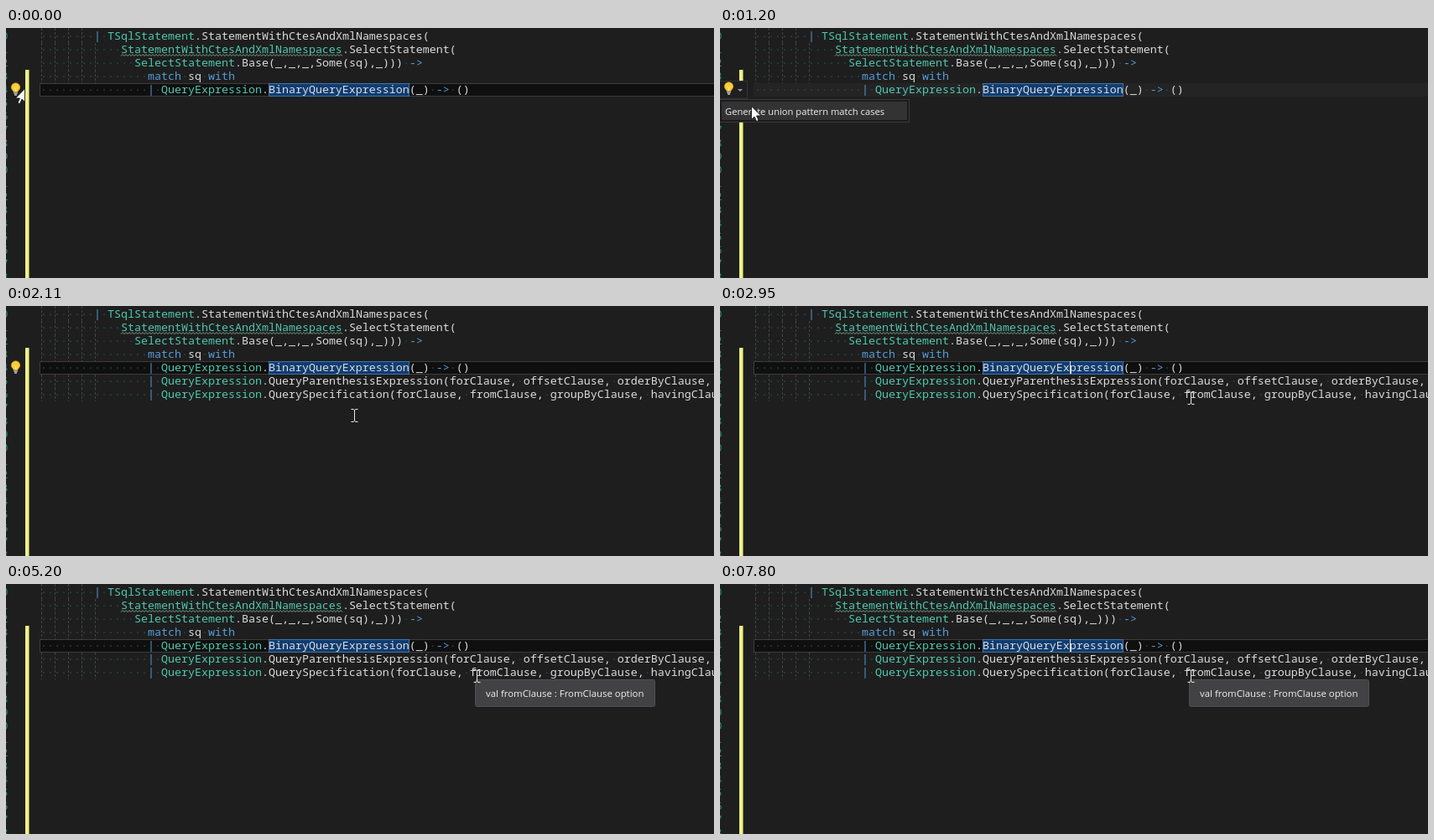
Recreate the animation shown at these times as an HTML page. Size 844 px wide and 299 px high, loop 8000 ms.

```html
<!DOCTYPE html>
<html lang="en">
<head>
<meta charset="utf-8">
<title>Union case generation</title>
<style>
html, body { margin: 0; width: 100%; height: 100%; overflow: hidden; background: #1e1e1e; }
svg { display: block; width: 844px; height: 299px; }
text { white-space: pre; fill: #dcdcdc; }
.code { font: 13.3333px "Noto Sans Mono", monospace; }
.ui { font-family: "Open Sans", sans-serif; fill: #f1f1f1; }
.type { fill: #4ec9b0; }
.keyword { fill: #569cd6; }
.space { fill: #2c4a50; }
.number { fill: #2b917f; }
.guide { stroke: #434343; stroke-dasharray: 3 2; }

#line, #cases, #button, #menu, #bulb, #caret, #tip, #margin, #arrow, #beam {
  animation: 8s step-end infinite;
}
#line { animation-name: line; }
#cases { animation-name: cases; }
#button { animation-name: button; }
#menu { animation-name: menu; }
#bulb { animation-name: bulb; }
#caret { animation-name: caret; }
#tip { animation-name: tip; }
#margin { animation-name: margin; }
#arrow { animation-name: arrow; }
#beam { animation-name: beam; }

@keyframes line {
  0%, 20% { fill: #0f0f0f; stroke: #3c3c3c; }
  6.75% { fill: #242424; stroke: #242424; }
}
@keyframes cases { 0% { opacity: 0; } 20% { opacity: 1; } }
@keyframes button { 0%, 20% { opacity: 0; } 3.375% { opacity: 1; } }
@keyframes menu { 0%, 20% { opacity: 0; } 6.75% { opacity: 1; } }
@keyframes bulb {
  0%, 24.875% { opacity: 1; transform: none; }
  3.375% { opacity: 1; transform: translate(-1px, -1px); }
  20%, 33.5% { opacity: 0; transform: none; }
}
@keyframes caret {
  0%, 26.375%, 38.75%, 51.375%, 65%, 77.75%, 90.875% { opacity: 0; }
  20%, 31.625%, 46%, 58.375%, 72%, 84.375%, 97.5% { opacity: 1; }
}
@keyframes tip { 0% { opacity: 0; } 40.625% { opacity: 1; } }
@keyframes margin {
  0% { opacity: 1; transform: translate(23px, 72px); }
  1.5%, 21.875% { opacity: 0; }
  20% { opacity: 1; transform: translate(37px, 93px); }
}
@keyframes arrow {
  0%, 20% { opacity: 0; }
  1.5% { opacity: 1; transform: translate(19px, 72px); }
  3.375% { opacity: 1; transform: translate(13px, 74px); }
  9.75% { opacity: 1; transform: translate(21px, 76px); }
  11.625% { opacity: 1; transform: translate(28px, 83px); }
  13.125% { opacity: 1; transform: translate(35px, 89px); }
  15% { opacity: 1; transform: translate(37px, 93px); }
}
@keyframes beam {
  0% { opacity: 0; }
  21.875% { opacity: 1; transform: translate(72px, 104px); }
  23.375% { opacity: 1; transform: translate(180px, 117px); }
  24.875% { opacity: 1; transform: translate(325px, 128px); }
  26.375% { opacity: 1; transform: translate(415px, 131px); }
  27.875% { opacity: 1; transform: translate(444px, 118px); }
  29.75% { opacity: 1; transform: translate(493px, 116px); }
  31.625% { opacity: 1; transform: translate(535px, 113px); }
  33.5% { opacity: 1; transform: translate(550px, 111px); }
  35% { opacity: 1; transform: translate(557px, 110px); }
  36.875% { opacity: 1; transform: translate(561px, 110px); }
}
</style>
</head>
<body>
<svg viewBox="0 0 844 299">
  <defs>
    <path id="pointer" d="M.5.5V16.5L4 13L6.6 18.6L9 17.5L6.5 12H11.5Z" fill="#fff" stroke="#111" stroke-width=".8"/>
  </defs>
  <rect width="844" height="299" fill="#1e1e1e"/>
  <g id="numbers"></g>
  <rect x="23" y="50" width="4.5" height="249" fill="#eff284"/>
  <rect id="line" x="40.5" y="66.5" width="808" height="15"/>
  <rect x="313.5" y="66.5" width="167" height="15" fill="#103c70" stroke="#3f74a8"/>
  <g id="base"></g>
  <g id="cases"></g>
  <path id="squiggle" fill="none" stroke="#85b39a" stroke-width=".9"/>
  <rect id="caret" x="417" y="66" width="1" height="15" fill="#dcdcdc"/>

  <g id="button">
    <rect x="-.5" y="63.5" width="33" height="21" fill="#1f1f20" stroke="#333337"/>
    <path d="M21 73h6l-3 3z" fill="#999"/>
  </g>
  <g id="menu">
    <rect x="-.5" y="85.5" width="226" height="27" fill="#1b1b1c" stroke="#3a3a3d"/>
    <rect x="2" y="88" width="221" height="22" fill="#333334"/>
    <text class="ui" x="6" y="104" font-size="11.2">Generate union pattern match cases</text>
  </g>
  <g id="bulb">
    <path d="M9 76.5C9 74.5 6.3 74 6.3 71a5.2 5.2 0 0 1 10.4 0C16.7 74 14 74.5 14 76.5Z" fill="#fc3" stroke="#d9a520" stroke-width=".7"/>
    <path d="M9.8 71l1.7 1.5 1.7-1.5M11.5 72.5v3.5" fill="none" stroke="#fff0b0"/>
    <path d="M9.2 78h4.6M10 80h3" stroke="#c8c8c8" stroke-width="1.3"/>
  </g>
  <g id="tip">
    <rect x="559.5" y="114.5" width="214" height="32" rx="2" fill="#424245" stroke="#4f4f53"/>
    <text class="ui" x="572" y="135" font-size="11.4">val fromClause : FromClause option</text>
  </g>

  <g id="margin"><use href="#pointer" transform="scale(-1 1)"/></g>
  <g id="arrow"><use href="#pointer"/></g>
  <g id="beam" fill="none">
    <path d="M-3.5-7.5H-1L.5-6.5L2-7.5H4.5M.5-6.5V6.5M-3.5 7.5H-1L.5 6.5L2 7.5H4.5" stroke="#e8e8e8"/>
  </g>
</svg>
<script>
const rowHeight = 16;
const columnWidth = 8;
const left = 41;
const lines = [
  [8, '| TSqlStatement.StatementWithCtesAndXmlNamespaces('],
  [12, 'StatementWithCtesAndXmlNamespaces.SelectStatement('],
  [14, 'SelectStatement.Base(_,_,_,Some(sq),_))) ->'],
  [16, 'match sq with'],
  [16, '| QueryExpression.BinaryQueryExpression(_) -> ()'],
  [16, '| QueryExpression.QueryParenthesisExpression(forClause, offsetClause, orderByClause, '],
  [16, '| QueryExpression.QuerySpecification(forClause, fromClause, groupByClause, havingClause, ']
];
const byId = id => document.getElementById(id);

function add(parent, tag, attributes, content = '') {
  const node = document.createElementNS('http://www.w3.org/2000/svg', tag);
  for (const [key, value] of Object.entries(attributes)) node.setAttribute(key, value);
  node.textContent = content;
  return parent.appendChild(node);
}

function addCode(parent, source, row) {
  const text = add(parent, 'text', { class: 'code', x: left, y: 14 + row * rowHeight });
  let typeSeen = false;
  for (const [token, space, keyword] of source.matchAll(/( +)|(\||->|\bmatch\b|\bwith\b)|\w+|[^\w ]/g)) {
    let kind = 'plain';
    if (space) kind = 'space';
    else if (keyword) kind = 'keyword';
    else if (!typeSeen && /^[A-Z]/.test(token)) {
      kind = 'type';
      typeSeen = true;
    }
    add(text, 'tspan', { class: kind }, space ? '·'.repeat(space.length) : token);
  }
}

lines.forEach(([indent, source], row) => {
  const parent = byId(row > 4 ? 'cases' : 'base');
  const top = row ? 2 + row * rowHeight : 0;
  const guides = row === 4 ? 0 : row ? 5 : 4;
  for (let i = 0; i < guides; i++) {
    const x = left + 1.5 + i * 2 * columnWidth;
    add(parent, 'line', { class: 'guide', x1: x, x2: x, y1: top, y2: 18 + row * rowHeight });
  }
  addCode(parent, ' '.repeat(indent) + source, row);
});

for (let row = 0; row < 19; row++) {
  add(byId('numbers'), 'text', { class: 'code number', x: -5.5, y: 14 + row * rowHeight }, row % 10);
}
byId('squiggle').setAttribute('d', 'M137 33.5' + 'l2-2l2 2'.repeat(66));
</script>
</body>
</html>
```
